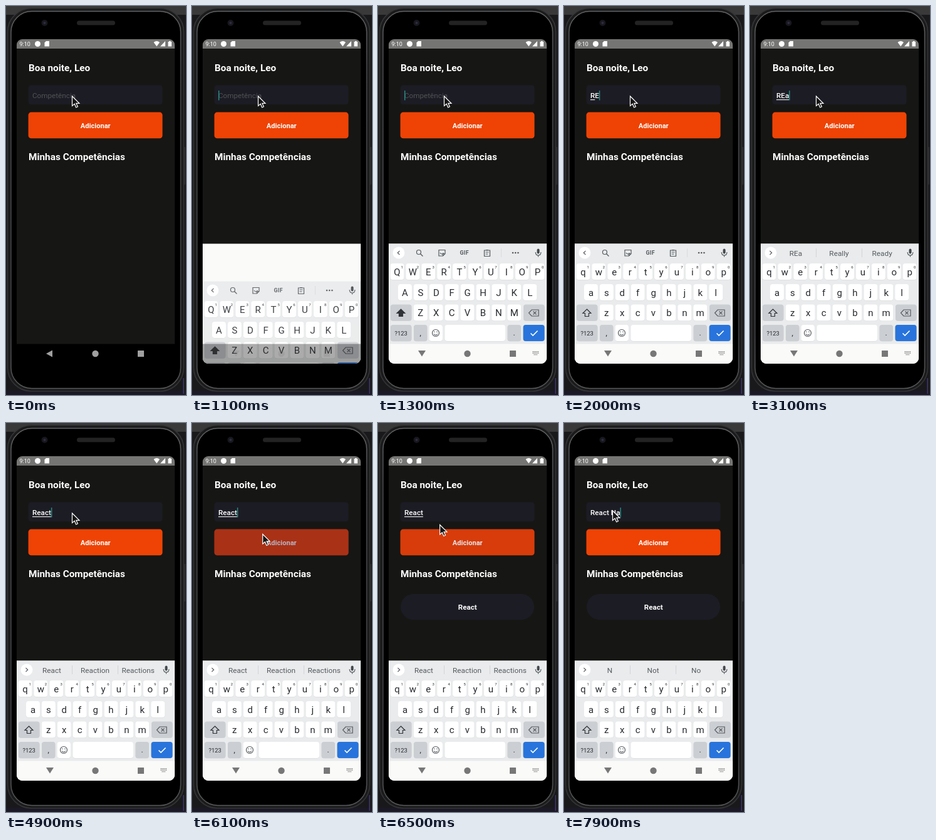
Recreate the animation shown at these times as an HTML page. Size 287 by 621 pixels, loop 8000 ms.

```html
<!DOCTYPE html>
<html lang="pt">
<head>
<meta charset="utf-8">
<style>
html, body { margin: 0; width: 100%; height: 100%; overflow: hidden; background: #19191c; }
svg { display: block; width: 287px; height: 621px; font-family: Roboto, sans-serif; }
.mid { text-anchor: middle; }
.bold { font-weight: 700; }
.line { fill: none; stroke: #55595e; stroke-width: 1.2; }
</style>
</head>
<body>
<svg viewBox="0 0 287 621">
  <defs>
    <linearGradient id="metal" x2="0" y2="1">
      <stop offset="0" stop-color="#626365"/><stop offset=".15" stop-color="#4a4b4d"/>
      <stop offset=".85" stop-color="#434446"/><stop offset="1" stop-color="#58595b"/>
    </linearGradient>
    <clipPath id="screen"><rect x="17" y="53" width="252" height="518" rx="9"/></clipPath>
  </defs>

  <!-- phone body -->
  <rect width="287" height="14" fill="#393939"/>
  <rect y="614" width="287" height="7" fill="#1c1926"/>
  <rect x="282.500" y="594" width="1.200" height="25" fill="#4a3f80"/>
  <rect x="283" y="225" width="3" height="60" rx="1" fill="#2b2b2d"/>
  <rect x="2.500" y="3.500" width="281" height="611.500" rx="38" fill="#1b1b1c" stroke="#343537" stroke-width="1.500"/>
  <rect x="8" y="8.500" width="270.500" height="602" rx="33" fill="#000" stroke="url(#metal)" stroke-width="1.500"/>
  <circle cx="61.500" cy="27" r="5" fill="#17171d"/>
  <circle cx="61.500" cy="27" r="2" fill="#2c2c40"/>
  <rect x="113" y="23.500" width="61" height="7" rx="3.500" fill="#232324"/>

  <g clip-path="url(#screen)">
    <rect x="17" y="53" width="252" height="487" fill="#161614"/>
    <rect x="17" y="53" width="252" height="15" fill="#757573"/>
    <g fill="#fff">
      <text x="21.500" y="64" font-size="9">9:10</text>
      <circle cx="50.500" cy="60.500" r="4.500"/>
      <path d="M64 56h5v8.500h-7.500v-6z"/>
      <path d="M235.500 58q4.700-3.800 9.500 0l-4.750 6.500z"/>
      <path d="M254 56v8.500h-8z"/>
      <path d="M258.500 57h1.500v-1h2.500v1h1.500v7.500h-5.500z"/>
      <g class="bold" font-size="15.350">
        <text x="36" y="103.800">Boa noite, Leo</text>
        <text x="36" y="246.200">Minhas Competências</text>
      </g>
    </g>

    <rect x="35.600" y="126.600" width="213.900" height="30.700" rx="4.500" fill="#1c1c25"/>
    <text id="field" x="42" y="147" font-size="11.700"></text>
    <rect id="underline" x="42" y="149" height="1.200" fill="#e4e4e6"/>
    <rect id="caret" y="135" width="1.500" height="15.500" fill="#278a80"/>

    <rect x="35.600" y="169.600" width="213.900" height="41.600" rx="4.500" fill="#ee4305"/>
    <text class="mid bold" x="142.700" y="195" font-size="11.100" fill="#fff">Adicionar</text>
    <rect id="shade" x="35.600" y="169.600" width="213.900" height="41.600" rx="4.500" fill="#0d0840"/>

    <g id="item">
      <rect x="36" y="273" width="213" height="41" rx="20.500" fill="#1c1c25"/>
      <text class="mid bold" x="142.700" y="298" font-size="11.600" fill="#fff">React</text>
    </g>

    <rect id="panel" x="17" y="379.500" width="252" height="191.500" fill="#fafaf9"/>
    <g id="keyboard">
      <rect x="17" y="379.500" width="252" height="161.500" fill="#e9ebec"/>
      <circle cx="33" cy="394" r="9.500" fill="#fff"/>
      <path id="chevron" class="line"/>
      <g id="tools">
        <circle class="line" cx="65" cy="393" r="3.500"/><path class="line" d="M67.500 395.500l4 4"/>
        <path class="line" d="M97 389.500h10v6l-3.500 3.500h-6.500zM99 394q3 4 5.500 0M107 395.500h-3.500v3.500"/>
        <text class="mid bold" x="137.700" y="397.200" font-size="8.800" letter-spacing=".4" fill="#55595e">GIF</text>
        <path class="line" d="M169.500 390h9v9.500h-9zM172 389.500h4M171.500 393h5M171.500 396h4"/>
        <path d="M196.500 387v14" stroke="#d8dadd"/>
        <g fill="#55595e"><circle cx="215" cy="394" r="1.300"/><circle cx="219.200" cy="394" r="1.300"/><circle cx="223.400" cy="394" r="1.300"/></g>
      </g>
      <g id="hints" class="mid" font-size="11.800" fill="#565a5f">
        <path d="M105.500 387v14M178.500 387v14" stroke="#d2d4d8"/>
        <text x="73" y="398.500"></text><text x="142" y="398.500"></text><text x="210.700" y="398.500"></text>
      </g>
      <rect x="253.500" y="387.500" width="4" height="8" rx="2" fill="#44484d"/>
      <path class="line" d="M251.200 393q0 5 4.300 5t4.300-5M255.500 398v2.500"/>
      <g id="keys"></g>
      <path id="shift" d="M36.500 484l6.500 6.500h-3.500v5h-6v-5h-3.500z" stroke="#303337" stroke-width="1.200"/>
      <path class="line" d="M245 485h11v10h-11l-4.500-5zM247.500 487.500l5 5M252.500 487.500l-5 5"/>
      <circle class="line" cx="92" cy="522" r="5.500"/>
      <path class="line" d="M89.200 523.500q2.800 4 5.600 0M90 519.500v1.500M94 519.500v1.500"/>
      <path d="M243.500 522.500l3.500 3.500 7.500-7.500" fill="none" stroke="#fff" stroke-width="1.600"/>
    </g>

    <rect id="navbar" x="17" y="539.500" width="252" height="31.500"/>
    <g id="nav">
      <path id="back"/>
      <circle cx="142.500" cy="555" r="5.200"/>
      <rect x="210" y="550" width="10" height="10" rx=".5"/>
      <path id="ime" d="M246.500 552h10M246.500 554.300h10M248.500 556.600h6" stroke="#777" stroke-width="1.300" stroke-dasharray="1.300 .8"/>
    </g>
  </g>

  <path id="mouse" d="M0 0v15.500l3.700-3.300 2.500 5.800 2.700-1.200-2.500-5.500h5z" fill="#151515" stroke="#fff" stroke-width="1.200"/>
</svg>
<script>
const LOOP = 8000;
const $ = id => document.getElementById(id);
const set = (id, attrs) => { for (const k in attrs) $(id).setAttribute(k, attrs[k]); };
const show = (id, on) => set(id, { opacity: on ? 1 : 0 });

// Each entry: start time, then its value
const typed = [[0, ''], [1900, 'R'], [2000, 'RE'], [2200, 'REa'], [2300, 'REac'], [2400, 'REact'],
  [2900, 'REac'], [3100, 'REa'], [3200, 'RE'], [3300, 'R'], [4100, 'Re'], [4300, 'Rea'],
  [4600, 'React'], [7500, 'React '], [7600, 'React N'], [7900, 'React Na']];
const marked = [[0, ''], [2000, 'R'], [2200, 'RE'], [2400, 'REa'], [2600, 'REact'], [2900, 'REac'],
  [3100, 'REa'], [3200, 'RE'], [3300, 'R'], [4200, 'Re'], [4600, 'Rea'], [4800, 'React'], [7500, '']];
const hints = [[0, ''], [2300, 'RE Re Red'], [2400, 'REa Really Ready'], [2900, 'REac React Reach'],
  [3000, 'REa Really Ready'], [3300, 'RE Re Ready'], [3700, 'R Re Really'], [4200, 'Re Red Ready'],
  [4300, 'Rea Really Ready'], [4600, 'Reac React Reach'], [4900, 'React Reaction Reactions'],
  [7500, 'to and is'], [7700, 'N Not No']];
const blinks = [[0, 0], [900, 1], [1700, 0], [1900, 1], [3900, 0], [4100, 1], [5300, 0],
  [5800, 1], [6300, 0], [6800, 1], [7200, 0], [7500, 1]];
const slide = [[900, 191], [1000, 122], [1100, 60], [1200, 20], [1300, 0]];
const press = [[6000, 0], [6100, .3], [6300, .3], [6600, 0]];
const mouseX = [[5500, 105.5], [5800, 124], [5900, 112.7], [6300, 112.7], [6800, 77.5]];
const mouseY = [[5500, 144], [5800, 177.5], [6300, 177.5], [6800, 140]];

const at = (list, t) => list.filter(e => e[0] <= t).pop()[1];
function tween(list, t) {
  const i = list.findIndex(e => e[0] > t);
  if (i === 0) return list[0][1];
  if (i < 0) return list[list.length - 1][1];
  const [t0, a] = list[i - 1], [t1, b] = list[i];
  return a + (b - a) * (t - t0) / (t1 - t0);
}

const pen = document.createElement('canvas').getContext('2d');
function widthOf(text) {
  pen.font = '500 11.7px Roboto, sans-serif';
  return pen.measureText(text).width;
}

const key = (x, y, w, fill = '#fff') =>
  `<rect x="${x}" y="${y + .6}" width="${w}" height="26" rx="4" fill="#d3d5d8"/>
   <rect x="${x}" y="${y}" width="${w}" height="26" rx="4" fill="${fill}"/>`;
const label = (x, y, text, size, cls = '') =>
  `<text class="mid ${cls}" x="${x}" y="${y}" font-size="${size}" fill="#282b2f">${text}</text>`;

function buildKeys() {
  const grey = '#cbced2', pitch = 24.9;
  let out = '';
  [['qwertyuiop', 30.5, 411], ['asdfghjkl', 43, 444], ['zxcvbnm', 67.8, 476.5]].forEach(([row, x0, y], r) => {
    [...row].forEach((c, i) => {
      const x = x0 + i * pitch;
      out += key(x - 11, y, 22) + label(x, y + 18.5, c, 15, 'letter');
      if (!r) out += label(x + 8, y + 8, (i + 1) % 10, 6);
    });
  });
  out += key(20, 476.5, 33.5, grey) + key(232, 476.5, 33.5, grey);
  out += key(20, 509, 33.5, grey) + label(36.7, 526, '?123', 9.5);
  out += key(57, 509, 21.5, grey) + label(67.7, 526, ',', 12);
  out += key(81.5, 509, 21.5) + key(106.5, 509, 96.5);
  out += key(206.5, 509, 21.5, grey) + label(217.2, 526, '.', 12);
  out += key(231.5, 509, 34, '#2874dc');
  $('keys').innerHTML = out;
}

let caps;
function setCaps(on) {
  if (caps === on) return;
  caps = on;
  document.querySelectorAll('.letter').forEach(e => {
    e.textContent = on ? e.textContent.toUpperCase() : e.textContent.toLowerCase();
  });
  set('shift', { fill: on ? '#303337' : 'none' });
}

function draw(t) {
  const text = at(typed, t);
  $('field').textContent = text || 'Competência';
  set('field', { fill: text ? '#fff' : '#515156', 'font-weight': text ? 500 : 400 });
  set('underline', { width: widthOf(at(marked, t)) });
  set('caret', { x: 42 + widthOf(text) });
  show('caret', at(blinks, t));

  const open = t >= 900, ready = t >= 1300;
  show('panel', open);
  set('keyboard', {
    transform: `translate(0 ${tween(slide, t)})`,
    opacity: open ? Math.min(1, .5 + (t - 900) / 500) : 0
  });
  setCaps(t < 2000);

  const words = at(hints, t).split(' ');
  show('tools', t < 2200);
  show('hints', t >= 2300);
  document.querySelectorAll('#hints text').forEach((e, i) => e.textContent = words[i] || '');
  set('chevron', { d: t >= 2200 ? 'M31.500 390.800l3.200 3.200-3.200 3.200' : 'M34.500 390.800l-3.200 3.200 3.200 3.200' });

  set('navbar', { fill: ready ? '#fafaf9' : '#000', opacity: !open || ready ? 1 : .33 * (1300 - t) / 200 });
  set('nav', { fill: open ? '#777' : '#a0a0a0', opacity: !open || ready ? 1 : .2 });
  set('back', { d: open ? 'M64 550h12l-6 9.500z' : 'M74 549.500v11l-10-5.500z' });
  show('ime', ready);

  set('shade', { opacity: tween(press, t) });
  show('item', t >= 6400);
  set('mouse', { transform: `translate(${tween(mouseX, t)} ${tween(mouseY, t)})` });
}

buildKeys();
const start = performance.now();
function tick() {
  const t = (performance.now() - start) % LOOP;
  draw(Math.floor(t / 100) * 100);
  requestAnimationFrame(tick);
}
tick();
</script>
</body>
</html>
```
